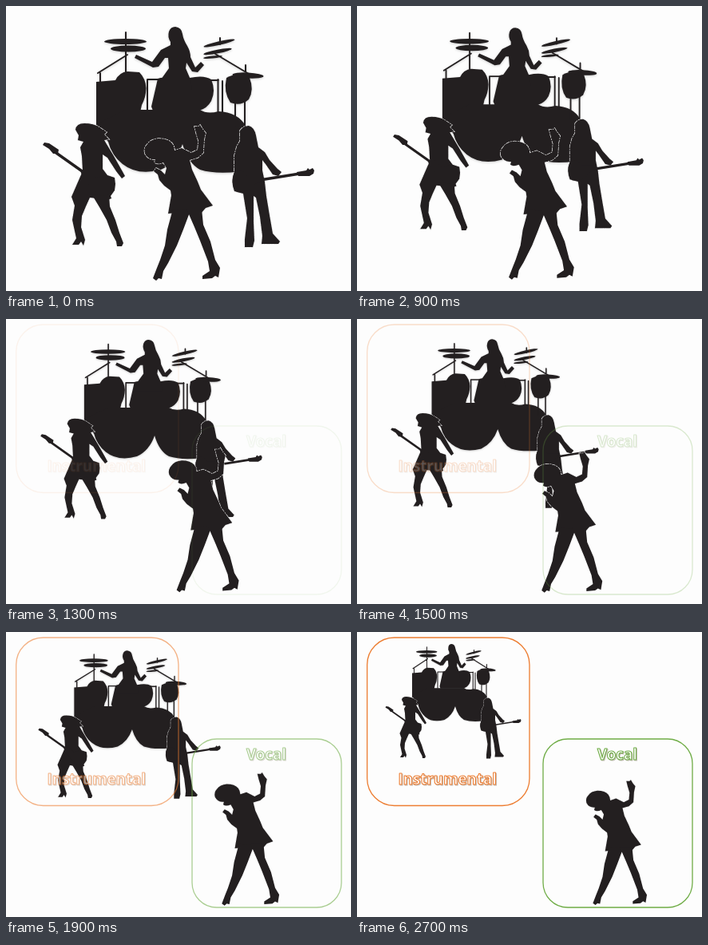
Recreate the animation shown at these times as an HTML page. Size 432 by 357 pixels, loop 3.1 s.

```html
<!DOCTYPE html>
<html lang="en">
<head>
<meta charset="utf-8">
<title>Instrumental and Vocal</title>
<style>
  html, body { margin: 0; width: 100%; height: 100%; overflow: hidden; background: #fdfdfd; }
  svg { display: block; width: 432px; height: 357px; }
  .ink { fill: #231f20; stroke: none; }
  .rod { fill: none; stroke: #231f20; stroke-width: 2; stroke-linecap: round; stroke-linejoin: round; }
  .neck { stroke-width: 3.4; }
  .halo { stroke: #e8e8e8; stroke-width: 1.5; stroke-dasharray: 5 1 2 1; paint-order: stroke; }
  #kit { filter: drop-shadow(0 1px 1.5px rgba(0, 0, 0, .2)); }
  .frame { fill: none; stroke-width: 1.3; }
  text {
    font: bold 18.7px "Open Sans", "Noto Sans", sans-serif;
    fill: #fff; stroke-width: 1.1; stroke-linejoin: round;
    filter: drop-shadow(1px 1px .4px rgba(90, 70, 50, .35));
  }
  .orange { stroke: #ed7d31; }
  .green { stroke: #70ad47; }
</style>
</head>
<body>
<svg viewBox="0 0 432 357">
  <g id="band">
    <g id="kit">
      <!-- drums -->
      <path class="ink" d="M113 95L137 93Q142 83 152 82L167 83Q175 91 175.500 103Q175 115 170 124L168 133V152H113Z"/>
      <path class="ink" d="M113 148L150 130H243Q252 136 266 132Q290 133 300 150L303 190Q303 205 292 207.500Q262 211 243 205Q228 197 221 173Q213 196 194 205Q165 213 146 198Q132 187 128 170Q118 160 113 148Z"/>
      <path class="ink" d="M190 91Q198 88 208 92L214 96L230 90Q248 86 257 92Q263 106 257 119Q252 128 242 131H184L182 126L188 100Z"/>
      <path class="ink" d="M276 90Q290 82 305 90Q311 105 304 117Q294 126 281 121Q272 108 276 90Z"/>
      <!-- stands and cymbals -->
      <path class="rod" d="M150 33V84M152 61L115 84M118 84V96M177 92V130M177 92H190M265.500 92V133M271 94V133M287 120V150M299 118V152M262 60L304 85M268 40V48M300 74V82M256 93H266"/>
      <g class="ink">
        <ellipse cx="149.500" cy="44.500" rx="26.500" ry="3.4"/>
        <ellipse cx="153" cy="53.500" rx="22" ry="4"/>
        <ellipse cx="267" cy="46.500" rx="20" ry="2.400" transform="rotate(-13 267 46.500)"/>
        <ellipse cx="265" cy="57" rx="18" ry="2.400" transform="rotate(-11 265 57)"/>
        <ellipse cx="259" cy="64" rx="12" ry="1.600" transform="rotate(-6 259 64)"/>
        <ellipse cx="303" cy="87" rx="19.500" ry="3.500" transform="rotate(3 303 87)"/>
      </g>
      <!-- drummer -->
      <path class="ink" d="M204 32Q206 26 212 26Q220 27 221 35Q222 42 227 50Q231 57 231 64L237 77L244 70L248 74L240 83L233 82L226 71L225 78L231 92L233 105H189L194 92L204 78L203 65L199 65L191 76L184 77L161 65L163 61L183 70L194 55L206 49L206 45Q202 39 204 32Z"/>
    </g>

    <g id="guitarist">
      <path class="ink halo" d="M87 155Q88 147 98 147Q110 147 117 152L126 158L123 161L129 167L123 168L129 178L135 188L144 204L149 213L145 216L138 207L127 190L121 186L121 204L127 212L136 215L137 223L136 231L131 238L132 241Q121 246 114 241L105 240L100 251L95 263L94 277L99 293L97 300L94 295L91 299H83L88 291L83 268L86 250L82 239L92 216L96 207L95 188L93 177L97 170L90 168L91 162Z"/>
      <path class="ink" d="M108 237L129 236L130 251L137 268L142 284L147 297L145 301H139L138 295L132 284L126 268L117 252Z"/>
      <path class="rod neck" d="M60 182L101 211"/>
      <path class="ink" d="M46 174L48 171L54 172L66 180L65 185L59 185L54 179Z"/>
      <path class="ink" d="M93 206L103 206L112 215L126 212Q137 219 134 232Q122 243 112 233L96 215Z"/>
    </g>

    <g id="bassist">
      <path class="ink halo" d="M293 156Q297 150 304 150Q311 152 313 162L316 177L324 183L330 193L340 204L345 208L341 213L334 211L325 198L321 193L321 206L324 220L326 238L330 262L334 285L343 295L341 298H320L321 288L318 264L313 240L310 238L310 270L311 294L309 302H299L299 292L302 266L297 235L286 232Q281 220 286 208L286 187L289 176L293 169Z"/>
      <path class="rod neck" d="M318 218L374 209"/>
      <path class="ink" d="M364 208L376 206L378 203L380 205L384 203L386 206L385 210L380 213L366 213Z"/>
      <path class="ink" d="M286 208Q296 202 302 213L320 213L323 218L312 223Q304 235 289 233Q280 222 286 208Z"/>
    </g>
  </g>

  <g id="singer">
    <path class="ink halo" d="M174 185Q172 178 177 173Q181 167 191 166Q203 166 208 172Q211 176 211 181L220 178L232 184L240 180L241 169L238 159L236 151L241 151L243 149L246 154L250 159L248 168L247 184L240 190L230 193L233 205L240 220L244 230L259 250L250 253L243 261L236 258L224 263L215 259L203 260L207 237L206 231L198 225L192 218L190 211L185 207L188 203L194 206L199 211L201 203L197 196Q190 199 186 196L187 192Q178 193 174 185Z"/>
    <path class="ink" d="M209 254L231 256L222 280L214 300L203 322L197 332L195 342L191 341L188 344L184 341L189 328L193 318L199 300L202 280Z"/>
    <path class="ink" d="M226 254L245 254L247 274L256 295L262 318L268 328L266 340L262 338L258 341L246 342L246 338L255 332L253 320L243 294L236 277Z"/>
  </g>

  <g id="labels">
    <rect class="frame orange" x="12.700" y="7" width="203.300" height="210.500" rx="34"/>
    <rect class="frame green" x="233" y="134" width="187" height="211" rx="31"/>
    <text class="orange" x="51.500" y="191">Instrumental</text>
    <text class="green" x="301" y="160">Vocal</text>
  </g>
</svg>
<script>
const LOOP = 3100, TICK = 100;
const byId = id => document.getElementById(id);

// Each key: time, scale, then where the anchor point lands.
const BAND_ANCHOR = [47, 301];
const BAND = [
  [600, 1, 47, 301], [700, .979, 47, 297], [1100, .867, 45, 265], [1500, .766, 43, 236],
  [1900, .672, 41, 208], [2300, .574, 38, 179], [2700, .5, 36, 158]
];
const SINGER_ANCHOR = [186, 342];
const SINGER = [
  [600, 1, 186, 342], [700, .995, 186, 341.5], [1100, .95, 198, 340], [1500, .905, 233, 341],
  [1900, .855, 272, 341], [2300, .815, 295, 341], [2700, .805, 297, 340.5]
];

const clamp = v => Math.max(0, Math.min(1, v));
const progress = (t, from, to) => clamp((t - from) / (to - from));

function sample(keys, t) {
  const next = keys.findIndex(key => key[0] > t);
  if (next === 0) return keys[0].slice(1);
  if (next < 0) return keys[keys.length - 1].slice(1);
  const a = keys[next - 1], b = keys[next];
  const k = progress(t, a[0], b[0]);
  return a.slice(1).map((v, i) => v + (b[i + 1] - v) * k);
}

function place(id, keys, anchor, t) {
  const [scale, x, y] = sample(keys, t);
  byId(id).setAttribute('transform',
    `translate(${x} ${y}) scale(${scale}) translate(${-anchor[0]} ${-anchor[1]})`);
}

function draw(time) {
  const t = Math.floor(time % LOOP / TICK) * TICK;
  place('band', BAND, BAND_ANCHOR, t);
  place('singer', SINGER, SINGER_ANCHOR, t);

  // The drum kit grows slightly taller as it settles.
  const stretch = 1 + .06 * progress(t, 2300, 2700);
  byId('kit').setAttribute('transform', `translate(0 209) scale(1 ${stretch}) translate(0 -209)`);

  byId('labels').setAttribute('opacity', progress(t, 1200, 2400));
}

const start = performance.now();
function loop() {
  draw(performance.now() - start);
  requestAnimationFrame(loop);
}
loop();
</script>
</body>
</html>
```
